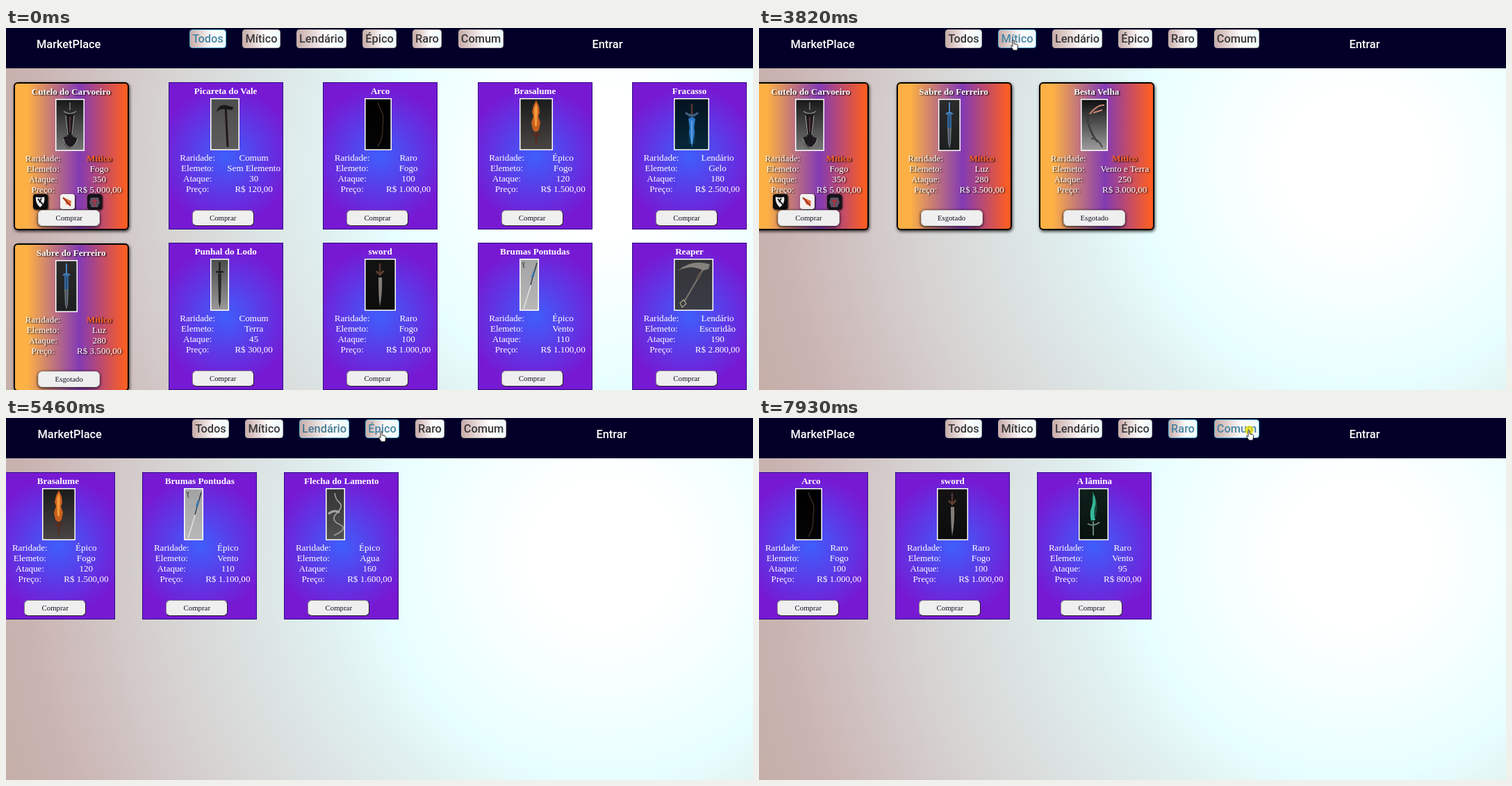
Animation, 1075 px wide and 521 px high, one loop 8000 ms. Source, as an HTML page:

```html
<!DOCTYPE html>
<html lang="pt">
<head>
<meta charset="utf-8">
<title>MarketPlace</title>
<style>
html, body { margin: 0; width: 100%; height: 100%; overflow: hidden; }
#stage {
  position: relative; width: 1075px; height: 521px; overflow: hidden;
  background: radial-gradient(circle at 860px 195px, #fff 100px, #f2ffff 230px, #e8ffff 320px,
    #e0f0f0 410px, #d6d3d2 640px, #cab4b3 830px, #c4aea6 930px);
  font: 13.08px/15px "Liberation Serif", "Times New Roman", serif; color: #fff;
}
#stage * { position: absolute; box-sizing: border-box; white-space: nowrap; }
header { left: 0; top: 0; width: 1075px; height: 58px; background: #020029; font: 500 16.36px/20px Roboto, sans-serif; }
.link { top: 14px; }
.tab {
  top: 2px; height: 27px; border: 1px solid; border-radius: 4px; text-align: center; line-height: 26px;
  background: linear-gradient(90deg, #c8aca8, #fff 62%, #ecfafa);
}
.tab span { left: 50%; transform: translateX(-50%); }
.scene { left: 0; top: 0; width: 1075px; height: 521px; }
.card { width: 165px; height: 212px; background: radial-gradient(circle, #3f5efb, #7719d3 74%); box-shadow: inset 0 0 0 1px #2c0f82; }
.card.myth {
  width: 166px; height: 213px; border-radius: 6px;
  background: linear-gradient(90deg, #fdb044 12%, #833ab4 57%, #fa5d25 96%);
  box-shadow: inset 0 0 0 2px #000, 1px 2px 4px rgba(0,0,0,.75);
  text-shadow: 1.5px 1.5px 2px rgba(0,0,0,.85);
}
.t { transform: translate(-50%, -50%); }
.b { font-weight: bold; }
.hot { font-weight: bold; color: #fb6420; }
.buy {
  left: 34px; top: 184px; width: 89px; height: 23px; border-radius: 6px; background: #efefef;
  border: 1.5px solid; border-color: #858585 #222 #222 #858585;
  color: #101020; font-size: 10.8px; line-height: 20px; text-align: center; text-shadow: none;
}
.myth .buy { left: 35px; border: 1px solid #ccc; line-height: 21px; box-shadow: 0 1px 4px #000; }
.icon { top: 161px; width: 21px; height: 22px; border-radius: 4px; box-shadow: 1px 1px 3px #000; }
#click { width: 13px; height: 13px; border-radius: 50%; background: rgba(238,226,0,.75); }
#stage svg * { position: static; }
#hand, #arrow { overflow: visible; width: 12px; height: 16px; }
</style>
</head>
<body>
<div id="stage">
  <header id="bar"></header>
  <div id="click"></div>
  <svg id="hand"><path d="M3 1.2Q4.2-.2 5.2 1.2V5.8L9.4 6.8Q10.8 7.3 10.6 8.8L9.8 15H4L.5 9.4Q.8 8 2 8.6L3 9.5Z" fill="#fff" stroke="#111" stroke-width=".9"/></svg>
  <svg id="arrow"><path d="M.5.5V12.5L3.3 9.9 5.1 14.1 6.8 13.3 5 9.3H8.8Z" fill="#fff" stroke="#111" stroke-width=".8"/></svg>
</div>
<script>
const $ = id => document.getElementById(id);
const stage = $('stage'), bar = $('bar');

function add(parent, cls, style, text = '') {
  const el = document.createElement('div');
  el.className = cls;
  Object.assign(el.style, style);
  el.textContent = text;
  parent.append(el);
  return el;
}
const px = n => n + 'px';
const label = (parent, x, y, text, cls = '') => add(parent, 't ' + cls, { left: px(x), top: px(y) }, text);

// Pictures: width, background top and bottom, then [colour, line width or 0 for fill, path]
const art = {
  cleaver: [42, '#161616', '#777',
    ['#1c1a1c', 0, 'M15 22H27L25 54 32 57Q29 70 20 71 11 68 12 55L17 54Z'],
    ['#9a9696', 1.2, 'M21 5V16M12 18Q21 24 30 18M15 24L18 52M27 24L24 52M12 58Q14 69 22 70 30 67 32 57'],
    ['#5c3540', 2, 'M21 26V48']],
  saber: [32, '#2b2b2b', '#1c1e1f',
    ['#73777a', 0, 'M13 38H19L18 64 16 71 14 64Z'], ['#356799', 0, 'M13 20H19V42H13Z'],
    ['#4a86c4', 2, 'M16 5V20M11 22Q16 17 21 22'], ['#1e3550', 1, 'M16 24V66']],
  pick: [42, '#4c4c4c', '#5d5d5d',
    ['#211917', 3, 'M22 12L25 70'], ['#1a1818', 0, 'M9 20Q12 8 22 10L33 13 32 17 22 16Q14 15 9 20Z']],
  bow: [39, '#000', '#050404', ['#332822', 1.6, 'M19 6Q22 15 25 20T26 42Q27 57 19 70']],
  flame: [48, '#1a1a1a', '#4a4644',
    ['#c95f1c', 0, 'M24 3L28 12 29 21 27 26 30 35 28 45 24 50 19 45 17 35 20 26 18 20 20 11Z'],
    ['#f59a3c', 0, 'M24 7L26 16 25 40H22L21 16Z'],
    ['#5a2a1d', 2.2, 'M24 48V67M18 50L24 55 30 50']],
  frost: [51, '#04121f', '#07283a',
    ['#0a3a55', 9, 'M26 22V66'], ['#2f78cc', 0, 'M21 30L26 27 31 30 29 42 30 50 26 71 22 50 23 42Z'], ['#8cc8f4', 1, 'M26 32V66'],
    ['#5a3437', 2.5, 'M26 8V27'], ['#45607f', 3, 'M17 21Q26 29 35 21']],
  dagger: [27, '#4b4b4b', '#9a9a9a',
    ['#2a2626', 0, 'M11 22H16L15 62 13.5 71 12 62Z'], ['#211c1c', 2.5, 'M13.5 5V22M8 19H19']],
  sword: [45, '#131313', '#0c0c0c',
    ['#837d79', 0, 'M20 27H25Q26 48 22 69 20 55 20 27Z'], ['#54352d', 2.5, 'M22 7V25'], ['#664034', 2.5, 'M17 18Q23 26 27 17']],
  spear: [28, '#a3a3a3', '#b8b8b8',
    ['#e0e0e0', 1.6, 'M20 26L6 72'], ['#33414e', 1.6, 'M25 6L16 38'], ['#3c78ad', 2.5, 'M21 18L18 27'], ['#444', 1, 'M4 5L7 14M7 5L5 12']],
  scythe: [57, '#343438', '#3a3c46',
    ['#7b766f', 2, 'M43 14L15 62'], ['#85827c', 0, 'M6 17Q26 0 52 8L50 15 42 17Q26 8 6 17Z'],
    ['#b5a98f', 1.2, 'M14 59L18 65 12 70 9 64Z'], ['#5f564b', 4, 'M39 20L34 29']],
  oldbow: [39, '#0c0c0c', '#a0a0a0',
    ['#3a3635', 2.5, 'M25 13Q6 20 11 36T24 62'], ['#c98676', 2, 'M13 22Q23 8 34 9M18 20L31 16'], ['#494442', 2, 'M15 57Q26 57 31 70M10 35H16']],
  axe: [38, '#000', '#080808',
    ['#6f6b6c', 3, 'M19 8V65'], ['#8a888e', 0, 'M7 11Q11 18 19 18 27 18 32 11 34 24 28 30L19 25 10 30Q4 24 7 11Z'],
    ['#c49035', 0, 'M16 17H22V24H16Z'], ['#777', 4, 'M19 59V66']],
  horn: [28, '#333', '#515151',
    ['#999', 1.8, 'M13 7Q14 16 20 21T16 36 20 52 12 68'], ['#a5a5a5', 3, 'M4 37Q12 30 20 35']],
  curved: [43, '#10201c', '#08110e',
    ['#17473b', 6, 'M21 12Q27 30 19 48'], ['#35b99b', 0, 'M20 5Q27 19 23 28 21 38 24 46H18Q15 36 19 26 22 16 20 5Z'],
    ['#68857a', 2, 'M13 51Q21 56 30 49M21 48V68']]
};

function picture(key) {
  const [w, top, bottom, ...parts] = art[key];
  const shapes = parts.map(([c, n, d]) => n
    ? `<path d="${d}" fill="none" stroke="${c}" stroke-width="${n}"/>`
    : `<path d="${d}" fill="${c}"/>`).join('');
  return `<svg width="${w}" height="75" style="background:linear-gradient(${top},${bottom})">${shapes}` +
    `<rect x=".75" y=".75" width="${w - 1.5}" height="73.5" fill="none" stroke="#fff" stroke-width="1.5"/></svg>`;
}

// name, rarity, element, attack, price; a sixth entry marks a sold-out item
const items = {
  cleaver: ['Cutelo do Carvoeiro', 'Mítico', 'Fogo', 350, '5.000'],
  saber: ['Sabre do Ferreiro', 'Mítico', 'Luz', 280, '3.500', 1],
  oldbow: ['Besta Velha', 'Mítico', 'Vento e Terra', 250, '3.000', 1],
  pick: ['Picareta do Vale', 'Comum', 'Sem Elemento', 30, '120'],
  dagger: ['Punhal do Lodo', 'Comum', 'Terra', 45, '300'],
  bow: ['Arco', 'Raro', 'Fogo', 100, '1.000'],
  sword: ['sword', 'Raro', 'Fogo', 100, '1.000'],
  curved: ['A lâmina', 'Raro', 'Vento', 95, '800'],
  flame: ['Brasalume', 'Épico', 'Fogo', 120, '1.500'],
  spear: ['Brumas Pontudas', 'Épico', 'Vento', 110, '1.100'],
  horn: ['Flecha do Lamento', 'Épico', 'Agua', 160, '1.600'],
  frost: ['Fracasso', 'Lendário', 'Gelo', 180, '2.500'],
  scythe: ['Reaper', 'Lendário', 'Escuridão', 190, '2.800'],
  axe: ['Voz do trovão', 'Lendário', 'Terra', 150, '2.500']
};

const icons = [
  ['#0c0c0c', 'M4 4Q10 6 16 4 18 13 10 19 3 13 4 4Z', '#eee', 'M7 7L15 16M12 6L9 12', '#222'],
  ['#f4f1ee', 'M5 5L16 10 15 16 9 15Z', '#e0703a', 'M4 5L15 17', '#a33222'],
  ['#15131a', 'M5 5H16L18 12 15 19H6L3 12Z', '#5b5162', 'M10.5 7V18M7 10H14', '#b0303c']
];

function card(scene, key, x, y) {
  const [name, rarity, element, attack, price, sold] = items[key];
  const myth = rarity === 'Mítico', d = myth ? 1 : 0;
  const el = add(scene, myth ? 'card myth' : 'card', { left: px(x), top: px(y) });
  label(el, 82.5, 12 + d, name, 'b');
  add(el, '', { left: '60px', top: px(23 + d) }).innerHTML = picture(key);
  [['Raridade:', rarity], ['Elemeto:', element], ['Ataque:', attack], ['Preço:', `R$ ${price},00`]].forEach(([k, v], i) => {
    const ry = 108.3 + d + i * 14.95;
    label(el, 42, ry, k);
    label(el, 123, ry, v, myth && !i ? 'hot' : '');
  });
  if (key === 'cleaver') icons.forEach(([bg, shape, fill, line, ink], i) => {
    add(el, 'icon', { left: px(27.5 + i * 39.3), background: bg }).innerHTML =
      `<svg width="21" height="22"><path d="${shape}" fill="${fill}"/><path d="${line}" stroke="${ink}" stroke-width="2"/></svg>`;
  });
  add(el, 'buy', {}, sold ? 'Esgotado' : 'Comprar');
}

// start time, first x, column pitch, keys
const scenes = [
  [0, 11.2, 222.45, 'cleaver pick bow flame frost saber dagger sword spear scythe'],
  [3820, -8, 205.6, 'cleaver saber oldbow'],
  [4560, -7.7, 204, 'frost scythe axe'],
  [5460, -7.7, 204, 'flame spear horn'],
  [6550, -7.7, 204, 'bow sword curved']
].map(([start, x, pitch, keys]) => {
  const el = add(stage, 'scene', {});
  stage.insertBefore(el, bar);
  keys.split(' ').forEach((key, i) => {
    const second = i > 4, myth = items[key][1] === 'Mítico';
    card(el, key, x + pitch * (i % 5), second ? (myth ? 310 : 309) : 78);
  });
  return { start, el };
});

const brand = add(bar, 'link', {}, 'MarketPlace'), login = add(bar, 'link', {}, 'Entrar');

// label, x, width, spans during which the tab is lit
const tabs = [
  ['Todos', 264, 53, [[-999, 3690]]],
  ['Mítico', 340, 55, [[1330, 4490]]],
  ['Lendário', 418, 72, [[1170, 1270], [4150, 5390]]],
  ['Épico', 513, 49, [[1030, 1130], [5000, 6410]]],
  ['Raro', 585, 42, [[5850, 9999]]],
  ['Comum', 651, 65, [[7700, 9999]]]
].map(([text, x, w, spans]) => {
  const el = add(bar, 'tab', { width: px(w) });
  el.append(document.createElement('span'));
  el.firstChild.textContent = text;
  return { el, x, w, spans };
});

// start, end, pictures, way points of the pointer
const moves = [
  [120, 880, 11, [[972, 484], [760, 280], [501, 61]]],
  [950, 1420, 7, [[509, 52], [520, 25], [470, 20], [400, 18], [365, 18]]],
  [3820, 4290, 8, [[366, 17], [375, 18], [430, 18], [457, 16]]],
  [4560, 5190, 10, [[457, 16], [465, 18], [525, 20], [540, 19]]],
  [5460, 6010, 9, [[540, 19], [550, 20], [595, 23], [602, 24]]],
  [6550, 7090, 9, [[602, 24], [612, 27], [655, 31], [685, 30]]],
  [7440, 7930, 8, [[690, 30], [721, 28], [712, 22], [705, 17]]]
];
const clicks = [[3690, 3820], [4490, 4560], [5390, 5460], [6410, 6480], [7930, 8000]];

const clamp = v => Math.max(0, Math.min(1, v));
const mix = (a, b, k) => `rgb(${a.map((v, i) => Math.round(v + (b[i] - v) * k))})`;
const show = (el, on) => { el.style.visibility = on ? 'visible' : 'hidden'; };

function pointer(t) {
  const m = moves.filter(m => m[0] <= t).pop();
  if (!m) return null;
  const [from, to, n, pts] = m;
  const step = Math.min(n - 1, Math.floor((t - from) / (to - from) * (n - 1) + .001));
  const f = step / (n - 1) * (pts.length - 1), i = Math.min(pts.length - 2, Math.floor(f));
  return pts[i].map((v, k) => v + (pts[i + 1][k] - v) * (f - i));
}

function draw(t) {
  const now = scenes.filter(s => s.start <= t).pop();
  scenes.forEach(s => show(s.el, s === now));
  // the page widens when its scrollbar goes
  const wide = now.start > 0, shift = wide ? 4 : 0;
  brand.style.left = px(wide ? 45.5 : 44);
  login.style.left = px(wide ? 849.5 : 843.5);
  const p = pointer(t);
  let over = false;
  for (const { el, x, w, spans } of tabs) {
    const left = x + shift;
    const lit = Math.max(...spans.map(([on, off]) => Math.min(clamp((t - on) / 120), 1 - clamp((t - off - 60) / 70))));
    el.style.left = px(left);
    el.style.color = mix([58, 56, 58], [72, 134, 164], lit);
    el.style.borderColor = mix([190, 176, 176], [84, 176, 214], lit);
    if (p && p[0] >= left && p[0] <= left + w && p[1] >= 2 && p[1] < 29) over = true;
  }
  show($('hand'), p && over);
  show($('arrow'), p && !over);
  show($('click'), p && clicks.some(([a, b]) => t >= a && t < b));
  if (!p) return;
  const place = (id, dx, dy) => { $(id).style.transform = `translate(${p[0] + dx}px,${p[1] + dy}px)`; };
  place('hand', -4, 0);
  place('arrow', 0, 0);
  place('click', -6, -6);
}

for (const id of ['click', 'hand', 'arrow']) Object.assign($(id).style, { left: 0, top: 0 });
const begin = performance.now();
function tick() {
  draw((performance.now() - begin) % 8000);
  requestAnimationFrame(tick);
}
tick();
</script>
</body>
</html>
```
